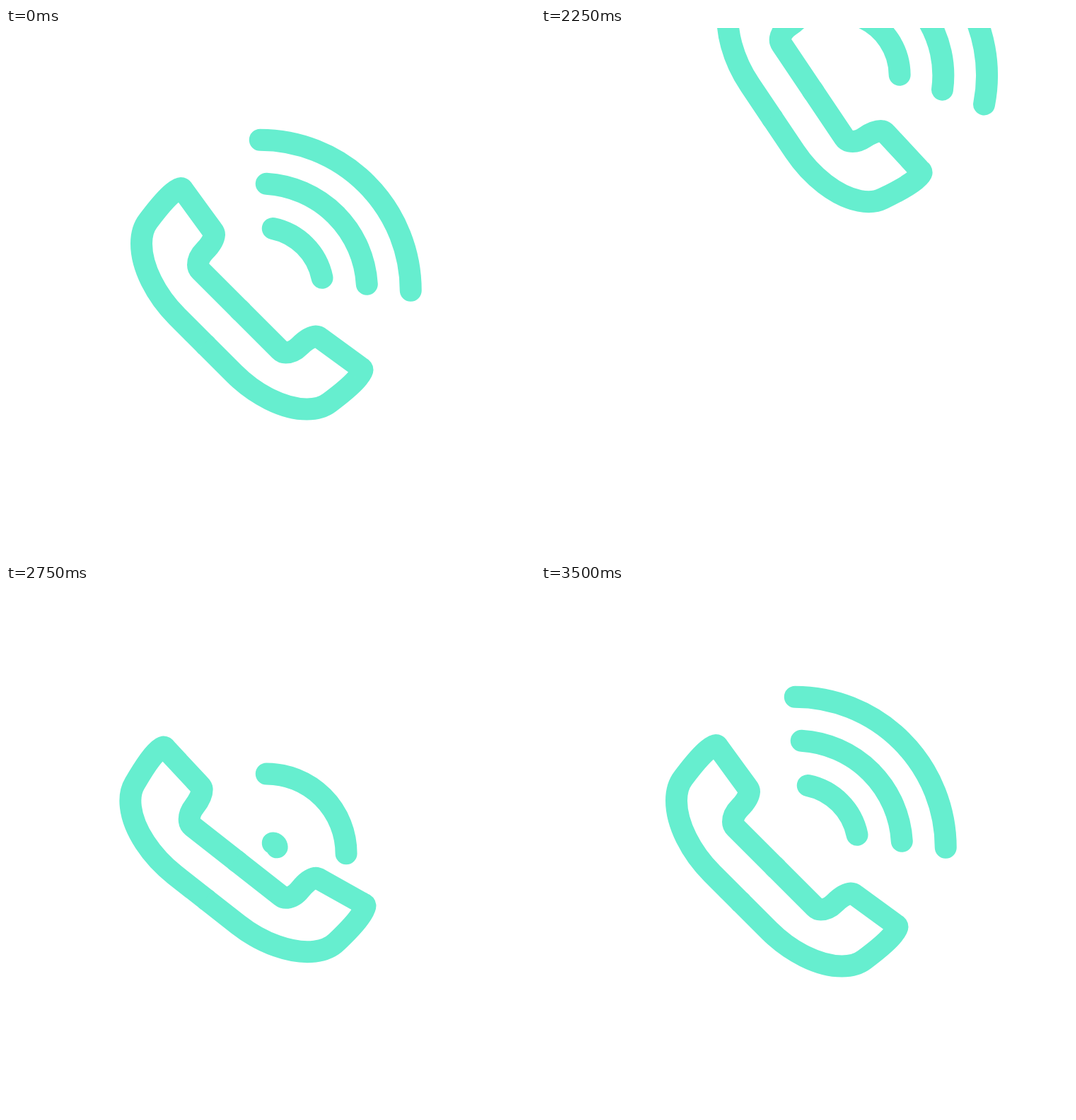
An HTML page that plays this animation: 748 by 748 pixels, repeating every 3520 ms.

```html
<!DOCTYPE html>
<html lang="en">
<head>
<meta charset="utf-8">
<title>Ringing phone</title>
<style>
  html, body { margin: 0; width: 100%; height: 100%; overflow: hidden; background: #fff; }
  svg { display: block; width: 100%; height: 100%; }
</style>
</head>
<body>
<svg viewBox="0 0 748 748">
  <defs>
    <path id="half" d="M284 450 L242 408 C212 378 191.5 338 191.5 305 C191.5 292 194 282 201 273
      C213 257 225 242 236 233 C241 229 245 226.5 247 226.5 C249 226.5 250 228 251 230
      L291.5 285.5 C293.5 288 294.5 290 294.5 292 C294 300 286 310 281 315
      C274 322 271.5 330 271.5 335 C271.5 338 273 341 275 343 L334 402"/>
  </defs>
  <g fill="none" stroke="#66eecf" stroke-width="31" stroke-linejoin="round">
    <g id="phone">
      <use href="#half"/>
      <use href="#half" transform="matrix(0 -1 -1 0 730.5 730.5)"/>
    </g>
    <g id="waves" stroke-linecap="round">
      <path/><path/><path/>
    </g>
  </g>
</svg>
<script>
const LOOP = 3520, STEP = 25;
// Phases of the motion, in ms
const LAUNCH = 2000, TILTED = 2250, DIVE = 2325, KICK = 2455, SWAY = 2575, SETTLE = 2975, REST = 3500;
const WAVES_BACK = 2565, STAGGER = 150, GROW = 600;
const PHONE_PIVOT = [341.5, 387.5], WAVE_PIVOT = [368, 362];

// Poses: dx, dy, angle
const STILL = [0, 0, 0];
const TILT = [55.5, -308, 11.1];
const LOW = [5, 105, -6];
const BACK = [-56, -84, -12];
const FORWARD = [21, 13.3, 11.7];
const WAVE_BACK = [-6, 0, -0.8];
const WAVE_FORWARD = [17.3, 11.2, 2.9];

const phone = document.getElementById('phone');
const waves = document.getElementById('waves');

const part = (t, from, to) => Math.min(1, Math.max(0, (t - from) / (to - from)));
const sine = u => (1 - Math.cos(Math.PI * u)) / 2;
const smooth = u => u * u * (3 - 2 * u);
const out = (u, power) => 1 - (1 - u) ** power;

// cubic-bezier(.25, .1, .25, 1)
function ease(x) {
  const bez = (u, p, q) => 3 * (1 - u) * (1 - u) * u * p + 3 * (1 - u) * u * u * q + u ** 3;
  let lo = 0, hi = 1;
  for (let i = 0; i < 24; i++) {
    const mid = (lo + hi) / 2;
    if (bez(mid, 0.25, 0.25) < x) lo = mid; else hi = mid;
  }
  return bez(hi, 0.1, 1);
}

// Blend two poses; each of dx, dy and angle has its own progress
const blend = (a, b, p) => a.map((v, i) => v + (b[i] - v) * p[i]);
const even = p => [p, p, p];

function launch(t) {
  const lift = Math.max(0, (t - LAUNCH) / (TILTED - LAUNCH));
  const lean = Math.min(1, lift) ** 1.32;
  return blend(STILL, TILT, [lean, lift ** 2.45, lean]);
}

function swing(t, back, forward) {
  if (t < SETTLE) {
    const u = part(t, SWAY, SETTLE);
    return blend(back, forward, [out(u, 1.8), out(u, 2.5), smooth(u) ** 1.7]);
  }
  return blend(forward, STILL, even(ease(part(t, SETTLE, REST))));
}

function phonePose(t) {
  if (t < DIVE) return launch(t);
  if (t < KICK) return blend(launch(DIVE), LOW, even(sine(part(t, DIVE, KICK))));
  if (t < SWAY) return blend(LOW, BACK, even(sine(part(t, KICK, SWAY))));
  return swing(t, BACK, FORWARD);
}

function place(node, [dx, dy, angle], pivot) {
  node.setAttribute('transform', `translate(${dx} ${dy}) rotate(${angle} ${pivot})`);
}

// Quarter rings around one centre, each trimmed a little more and growing from its corner
function drawWave(path, i, size) {
  const trim = 9 * i, radius = 213 - 61.7 * i;
  const span = (Math.sqrt(radius ** 2 - trim ** 2) - trim) * size;
  const x = 359.25 + trim, y = 371.25 - trim, r = radius * size;
  path.style.display = size > 0 ? '' : 'none';
  path.setAttribute('d', `M${x} ${y - span} A${r} ${r} 0 0 1 ${x + span} ${y}`);
}

function render(time) {
  const t = Math.floor((time % LOOP + 5) / STEP) * STEP;
  const leaving = t < DIVE;
  const body = phonePose(t);
  place(phone, body, PHONE_PIVOT);
  if (leaving) place(waves, body, PHONE_PIVOT);
  else place(waves, swing(t, WAVE_BACK, WAVE_FORWARD), WAVE_PIVOT);

  [...waves.children].forEach((path, i) => {
    const begin = WAVES_BACK + i * STAGGER;
    const size = leaving ? 1 : t > begin ? ease(part(t, begin, begin + GROW)) : 0;
    drawWave(path, i, size);
  });
}

const start = performance.now();
function tick() {
  render(performance.now() - start);
  requestAnimationFrame(tick);
}
tick();
</script>
</body>
</html>
```
